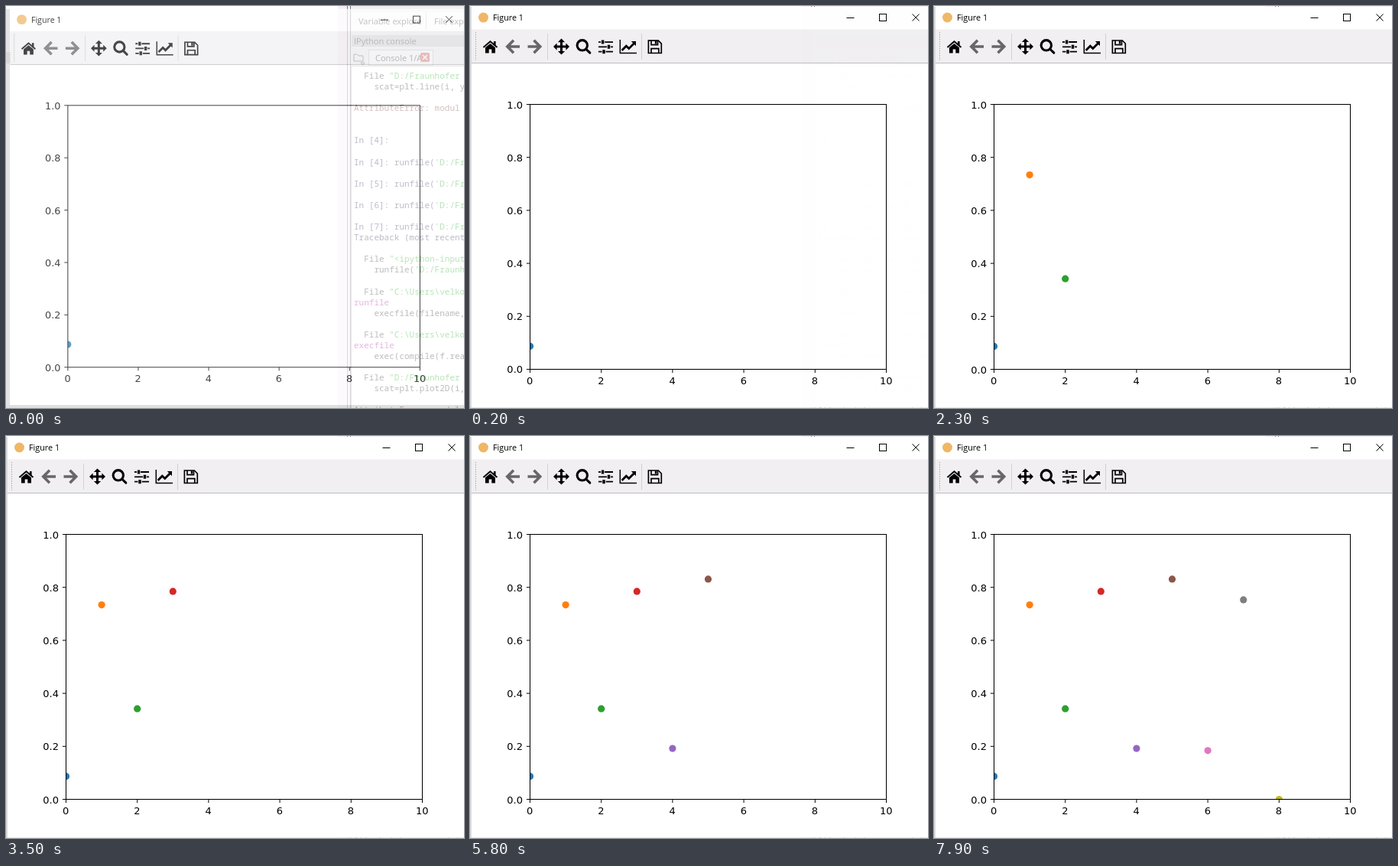
An HTML page that plays this animation: 599 by 525 pixels, repeating every 8000 ms.

```html
<!DOCTYPE html>
<html lang="en">
<head>
<meta charset="utf-8">
<title>Scatter plot</title>
<style>
  html, body { margin: 0; width: 100%; height: 100%; overflow: hidden; background: #fff; }
  svg { display: block; }
  .ui { font-family: "Open Sans", sans-serif; }
  .tick { font: 13px "DejaVu Sans", sans-serif; }
  .code { font: 11px "Noto Sans Mono", monospace; white-space: pre; }
</style>
</head>
<body>
<svg width="599" height="525" viewBox="0 0 599 525">
  <defs>
    <clipPath id="plot"><rect x="78.5" y="128.5" width="466" height="346"/></clipPath>
  </defs>

  <!-- IDE behind the window -->
  <g class="ui" font-size="11" fill="#222">
    <rect width="599" height="525" fill="#fff"/>
    <rect x="434" width="12" height="525" fill="#f6eef6"/>
    <rect x="447" width="152" height="525" fill="#f0f0f0"/>
    <rect y="60" width="6" height="15" fill="#ccc"/>
    <path d="M446.5 0V525M450.5 0V525" stroke="#777"/>
    <rect x="452" y="8" width="147" height="24" fill="#f8f8f8"/>
    <text x="461" y="24">Variable explore</text>
    <path d="M549.5 8V32" stroke="#bbb"/>
    <text x="560" y="24">File explo</text>
    <rect x="452" y="38" width="147" height="15" fill="#c8c8c8"/>
    <text x="455" y="49.5">IPython console</text>
    <path d="M455 72V63H459L461 65H467V72ZM464 74H469L466.5 77Z" fill="none" stroke="#444"/>
    <rect x="474.5" y="57.5" width="84" height="20" fill="#fff" stroke="#bbb"/>
    <text x="483" y="72">Console 1/A</text>
    <rect x="542" y="61" width="12" height="12" rx="2" fill="#d4382a"/>
    <path d="M545 64L551 70M551 64L545 70" stroke="#fff" stroke-width="1.6"/>
    <rect x="451.5" y="78.5" width="160" height="460" fill="#fff" stroke="#aaa"/>
    <g id="console"></g>
  </g>

  <g id="window">
    <rect x="-6" y="1" width="8" height="530" fill="#dadada"/>
    <rect x="-6" y="524.3" width="660" height="8" fill="#d4d4d4"/>
    <rect x="2" y="1" width="650" height="523.3" fill="#fff"/>
    <rect x="2" y="30.5" width="650" height="44" fill="#f1eff2"/>
    <path d="M2 74.5H652" stroke="#bcbcbc"/>

    <circle cx="17.5" cy="15" r="6.5" fill="#eeb868"/>
    <text class="ui" x="30" y="19.3" font-size="10.8">Figure 1</text>
    <g fill="none" stroke="#000">
      <path d="M492.5 15.5H502.5M578.5 10.5L587.5 19.5M587.5 10.5L578.5 19.5"/>
      <rect x="535.5" y="10.5" width="9" height="9"/>
    </g>

    <path d="M7.5 34V71" stroke="#aaa" stroke-dasharray="1.5 1.5"/>
    <path d="M101.5 36V70M224.5 36V70" stroke="#d2d0d3"/>

    <!-- home -->
    <path d="M17.5 54L26.5 46.3L35.5 54" fill="none" stroke="#000" stroke-width="2"/>
    <path d="M31 46H33.6V52H31ZM20 54.3L26.5 49L33 54.3V61.5H28.3V56.5H24.7V61.5H20Z"/>
    <!-- back, forward -->
    <g fill="none" stroke="#686668" stroke-width="3.6">
      <path id="arrow" d="M57 44.8L48.8 53L57 61.2M49 53H65"/>
      <use href="#arrow" transform="matrix(-1 0 0 1 140.5 0)"/>
    </g>
    <!-- pan -->
    <path d="M111 53H128M119.5 44.5V61.5" stroke="#000" stroke-width="3"/>
    <path d="M109 53L113.6 48.4V57.6ZM130 53L125.4 48.4V57.6ZM119.5 42.5L114.9 47.1H124.1ZM119.5 63.5L114.9 58.9H124.1Z"/>
    <!-- zoom -->
    <g fill="none" stroke="#000" stroke-width="3.1" stroke-linecap="round">
      <circle cx="146.8" cy="51.3" r="6.7"/>
      <path d="M152 56.5L156.8 61.2"/>
    </g>
    <!-- subplots -->
    <path d="M168 47H171M176.2 47H187M168 53.3H179M184 53.3H187M168 59.7H172.5M177.6 59.7H187" stroke="#000" stroke-width="1.8"/>
    <path d="M173.6 44.5V49.5M181.5 50.8V55.8M175 57.2V62.2" stroke="#000" stroke-width="3.4"/>
    <!-- axes -->
    <path d="M196.3 44V61.6H218" fill="none" stroke="#000" stroke-width="1.5"/>
    <path d="M198.6 58L204.3 52.2L207.8 55.6L214.5 48.8" fill="none" stroke="#000" stroke-width="2.8"/>
    <path d="M210.8 46H217V52.2Z"/>
    <!-- save -->
    <g fill="none" stroke="#000" stroke-width="1.7">
      <path d="M233.4 45H246.3L250.3 49V61.5H233.4Z"/>
      <path d="M237 45V50.6H245.5V45M237 61.5V55.6H246.8V61.5"/>
      <path d="M243 45.5V49.5" stroke-width="2.4"/>
    </g>

    <g id="ticks" class="tick"></g>
    <g id="points" clip-path="url(#plot)"></g>
    <rect x="78.5" y="128.5" width="466" height="346" fill="none" stroke="#000" stroke-width="1.05"/>
  </g>
</svg>
<script>
const LOOP = 8000, STEP = 100;
const NS = 'http://www.w3.org/2000/svg';
const $ = id => document.getElementById(id);

function add(parent, tag, attrs, text) {
  const el = document.createElementNS(NS, tag);
  for (const key in attrs) el.setAttribute(key, attrs[key]);
  if (text !== undefined) el.textContent = text;
  parent.appendChild(el);
  return el;
}

const plotX = v => 78.5 + 46.6 * v;
const plotY = v => 474.5 - 346 * v;

for (let i = 0; i <= 5; i++) {
  const x = plotX(2 * i), y = plotY(i / 5), ticks = $('ticks');
  add(ticks, 'path', { d: `M${x} 474.5v4.6M78.5 ${y}h-4.6`, stroke: '#000' });
  add(ticks, 'text', { x: x - 0.3, y: 494, 'text-anchor': 'middle' }, 2 * i);
  add(ticks, 'text', { x: 69, y: y + 5, 'text-anchor': 'end' }, (i / 5).toFixed(1));
}

const values = [0.087, 0.734, 0.342, 0.785, 0.192, 0.831, 0.184, 0.753, 0];
const colors = ['#1f77b4', '#ff7f0e', '#2ca02c', '#d62728', '#9467bd',
  '#8c564b', '#e377c2', '#7f7f7f', '#bcbd22'];
const dots = values.map((v, i) =>
  add($('points'), 'circle', { cx: plotX(i), cy: plotY(v), r: 4.6, fill: colors[i] }));

// Console lines by row; quoted text is green.
const run = n => `In [${n}]: runfile('D:/Fr`;
const lines = {
  0: '  File "D:/Fraunhofer', 1: '    scat=plt.line(i, y', 3: 'AttributeError: modul',
  6: 'In [4]:', 8: run(4), 10: run(5), 12: run(6), 14: run(7),
  15: 'Traceback (most recent', 17: '  File "<ipython-input', 18: "    runfile('D:/Fraunh",
  20: '  File "C:\\Users\\velko', 21: 'runfile', 22: '    execfile(filename,',
  24: '  File "C:\\Users\\velko', 25: 'execfile', 26: '    exec(compile(f.rea',
  28: '  File "D:/Fraunhofer', 29: '    scat=plt.plot2D(i,', 31: 'AttributeError: modul'
};
function lineColor(text) {
  if (/^(runfile|execfile)$/.test(text)) return '#a000a0';
  if (/^Attr/.test(text)) return '#602020';
  return /^(In|Trace)/.test(text) ? '#101040' : '#111';
}
for (const row in lines) {
  const [plain, quoted] = lines[row].split(/(?=["'])/);
  const el = add($('console'), 'text',
    { class: 'code', x: 455, y: 95 + 14.08 * row, fill: lineColor(plain) }, plain);
  if (quoted) add(el, 'tspan', { fill: '#00a000' }, quoted);
}

function draw(time) {
  const t = Math.floor(time / STEP) * STEP;
  // The window fades and grows into place.
  const open = t >= 300 ? 0 : Math.exp(-t / 45);
  const scale = 1 - 0.0117 * open;
  $('window').setAttribute('opacity', 1 - 0.28 * open);
  $('window').setAttribute('transform',
    `translate(${280 * (1 - scale)} ${240 * (1 - scale)}) scale(${scale})`);
  dots.forEach((dot, i) =>
    dot.setAttribute('visibility', i === 0 || t >= 1000 * i - 100 ? 'visible' : 'hidden'));
}

function loop() {
  draw(performance.now() % LOOP);
  requestAnimationFrame(loop);
}
loop();
</script>
</body>
</html>
```
